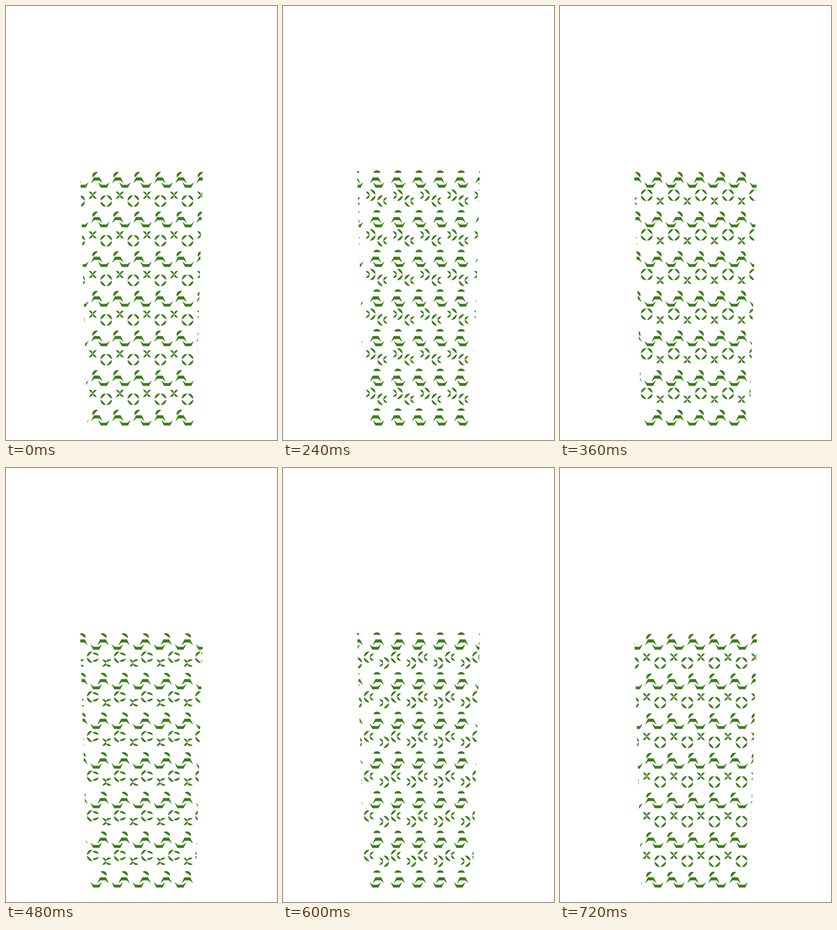
Recreate the animation shown at these times as an HTML page. Size 591x948 px, loop 750 ms.

```html
<!DOCTYPE html>
<html lang="en">
<head>
<meta charset="utf-8">
<title>Green pattern</title>
<style>
  html, body { margin: 0; width: 100%; height: 100%; overflow: hidden; background: #fff; }
  svg { display: block; width: 100%; height: 100%; }
</style>
</head>
<body>
<svg viewBox="0 0 591 948">
  <defs>
    <clipPath id="panel"><path d="M161.5 355H429.6L413.4 920H177.6Z"/></clipPath>
    <path id="petal" d="M-8.3 0A10.4 10.4 0 0 1 8.3 0Q0 1.2 -8.3 0Z"/>
    <g id="figure">
      <path id="cap" d="M-8 0A8.6 8.6 0 0 1 8 0Z"/>
      <path id="arch"/>
      <path id="bowl"/>
    </g>
    <g id="flowerA"></g>
    <g id="flowerB"></g>
  </defs>
  <g id="rows" clip-path="url(#panel)" fill="#3b7e1a"></g>
</svg>
<script>
const NS = 'http://www.w3.org/2000/svg';
const FRAME = 30, FRAMES = 25, HALF = 12;
const ROW = 86.6, FIGURE_GAP = 45.95, FLOWER_GAP = 59.1;
const $ = id => document.getElementById(id);

function add(parent, tag, attrs) {
  const el = document.createElementNS(NS, tag);
  for (const name in attrs) el.setAttribute(name, attrs[name]);
  return parent.appendChild(el);
}

function use(parent, id, x, y) {
  return add(parent, 'use', { href: '#' + id, x, y });
}

// Small teeth along a flat edge, from x = -w to x = w
function teeth(w, y, depth) {
  let d = '';
  const n = 10;
  for (let i = 0; i <= n; i++) {
    d += `L${(-w + 2 * w * i / n).toFixed(2)} ${i % 2 ? y + depth : y}`;
  }
  return d;
}

$('arch').setAttribute('d', 'M-12.7 387.6' + teeth(6.5, 375, -1.2) + 'L12.7 387.6L5.6 381.2H-5.6Z');
$('bowl').setAttribute('d', 'M-12.7 385' + teeth(7, 396.2, 1.2) + 'L12.7 385L5.8 390.6H-5.8Z');

// Each flower has two right petals and two left petals
function makeFlower(id) {
  const sides = { right: [], left: [] };
  for (const [name, sx] of [['right', 1], ['left', -1]]) {
    for (const sy of [1, -1]) {
      const corner = add($(id), 'g', { transform: `scale(${sx} ${sy})` });
      sides[name].push(use(corner, 'petal', 0, 0));
    }
  }
  return sides;
}

const flowerA = makeFlower('flowerA');
const flowerB = makeFlower('flowerB');

for (let r = 0; r < 7; r++) {
  const y = r * ROW;
  for (let c = -1; c < 6; c++) use($('rows'), 'figure', 204.9 + c * FIGURE_GAP, y);
  if (r === 6) break;
  for (let c = -1; c < 5; c++) {
    use($('rows'), 'flowerA', 189.1 + c * FLOWER_GAP, 413.2 + y);
    use($('rows'), 'flowerB', 218.6 + c * FLOWER_GAP, 426 + y);
  }
}

const mix = (a, b, p) => a + (b - a) * p;

// open: 0 is a small cross petal, 1 is a ring segment
function setPetals(petals, open) {
  const x = mix(4.7, 6.5, open), y = mix(-3.5, -6.5, open);
  const angle = mix(-45, 45, open);
  const size = `${mix(0.7, 1, open)} ${mix(0.85, 1, open)}`;
  for (const p of petals) {
    p.setAttribute('transform', `translate(${x} ${y}) rotate(${angle}) scale(${size})`);
  }
}

const easeIn = p => 1 - Math.cos(p * Math.PI / 2);

function draw(ms) {
  const k = Math.floor(ms / FRAME) % FRAMES % (2 * HALF);
  const back = k >= HALF;
  const turn = v => back ? 1 - v : v;
  const e = easeIn(k % HALF / HALF);

  const tilt = mix(-45, 45, turn(e));
  $('cap').setAttribute('transform', `translate(0 379) rotate(${tilt}) translate(0 -14.5)`);

  const slide = 2 * turn(easeIn(e)) - 1;
  $('arch').setAttribute('transform', `translate(${7 * slide} 0)`);
  $('bowl').setAttribute('transform', `translate(${-8.5 * slide} 0)`);

  const right = turn(Math.min(1, 2 * e));
  const left = turn(Math.max(0, 2 * e - 1));
  setPetals(flowerA.right, right);
  setPetals(flowerA.left, left);
  setPetals(flowerB.right, 1 - right);
  setPetals(flowerB.left, 1 - left);
}

let start;
function tick(now) {
  if (start === undefined) start = now;
  draw(Math.max(0, now - start));
  requestAnimationFrame(tick);
}
draw(0);
requestAnimationFrame(tick);
</script>
</body>
</html>
```
